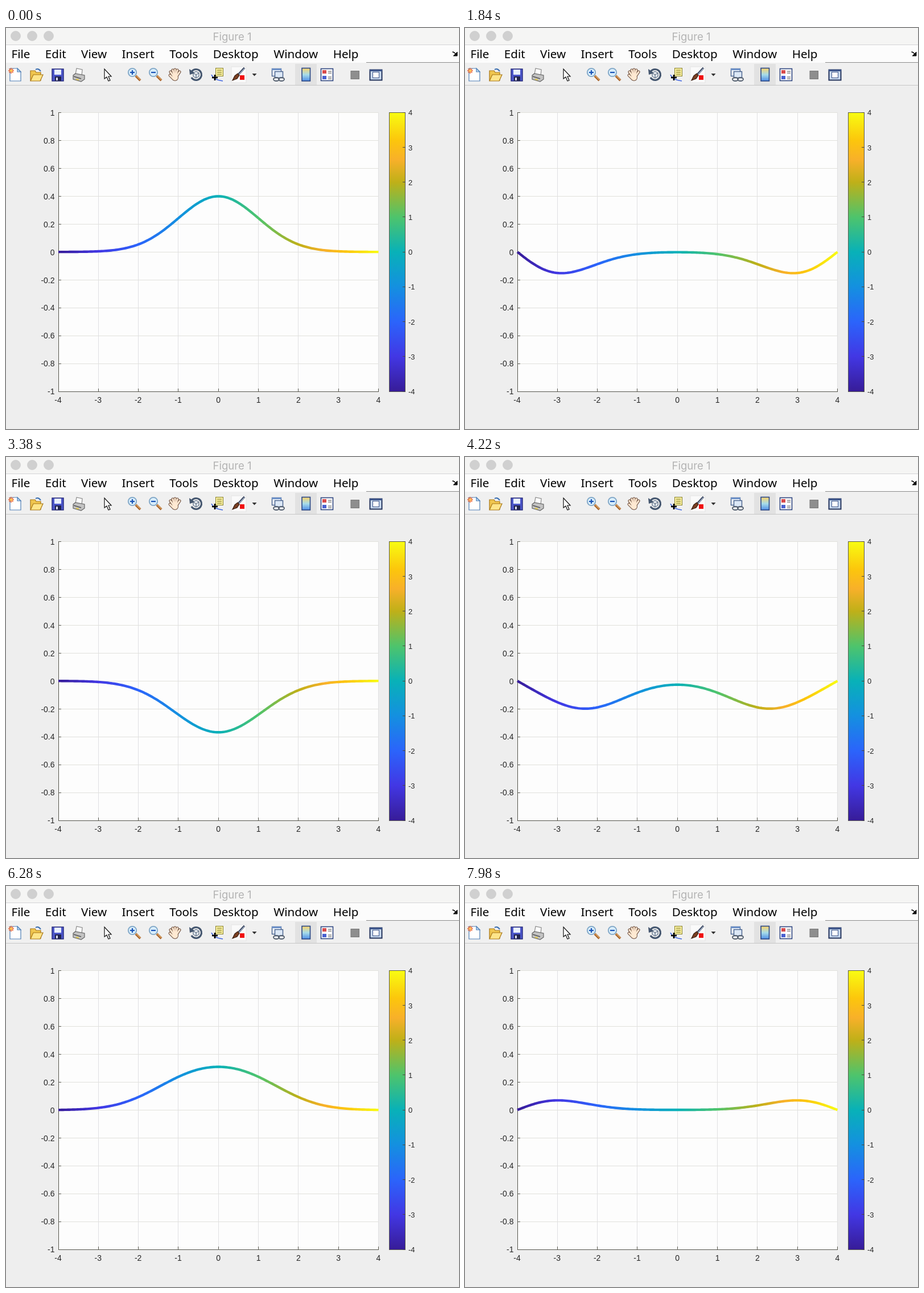
An HTML page with a canvas that plays this animation: 796x704 px, repeating every 8000 ms.

```html
<!DOCTYPE html>
<html lang="en">
<head>
<meta charset="utf-8">
<title>Figure 1</title>
<style>
html, body { margin: 0; width: 100%; height: 100%; overflow: hidden; background: #eee; }
canvas { display: block; }
</style>
</head>
<body>
<canvas id="stage" width="796" height="704"></canvas>
<script>
const stage = document.getElementById('stage');
const view = stage.getContext('2d');
const backdrop = document.createElement('canvas');
backdrop.width = stage.width;
backdrop.height = stage.height;
const c = backdrop.getContext('2d');

const LOOP = 8000;
const LEFT = 92, RIGHT = 654.5, TOP = 148.3, BOTTOM = 638;
const INK = '#262626', AXIS = '#55554c';
const px = x => LEFT + (x + 4) * (RIGHT - LEFT) / 8;
const py = y => BOTTOM - (y + 1) * (BOTTOM - TOP) / 2;
const snap = v => Math.floor(v) + .5;

// Colour map over 0..1
const MAP = {
  0: '#371c98', .125: '#4237e4', .25: '#2b64fb', .375: '#1490e0', .5: '#08b1b8',
  .625: '#4ec46c', .75: '#bfb018', .83: '#f8b02a', .9: '#fcc60c', 1: '#f8fc12'
};

function gradient(ctx, x0, y0, x1, y1, stops) {
  const g = ctx.createLinearGradient(x0, y0, x1, y1);
  for (const at in stops) g.addColorStop(+at, stops[at]);
  return g;
}

function rect(x, y, w, h, fill, stroke, width = 1) {
  if (fill) { c.fillStyle = fill; c.fillRect(x, y, w, h); }
  if (stroke) { c.strokeStyle = stroke; c.lineWidth = width; c.strokeRect(x, y, w, h); }
}

function line(colour, width, x0, y0, x1, y1) {
  c.beginPath();
  c.moveTo(x0, y0);
  c.lineTo(x1, y1);
  c.strokeStyle = colour;
  c.lineWidth = width;
  c.stroke();
}

function shape(path, fill, stroke, width = 1.2) {
  const p = new Path2D(path);
  if (fill) { c.fillStyle = fill; c.fill(p); }
  if (stroke) { c.strokeStyle = stroke; c.lineWidth = width; c.stroke(p); }
}

function disc(x, y, r, fill, stroke, width = 1) {
  c.beginPath();
  c.arc(x, y, r, 0, Math.PI * 2);
  if (fill) { c.fillStyle = fill; c.fill(); }
  if (stroke) { c.strokeStyle = stroke; c.lineWidth = width; c.stroke(); }
}

function text(str, x, y, font, colour, align = 'left') {
  c.font = font;
  c.fillStyle = colour;
  c.textAlign = align;
  c.fillText(str, x, y);
}

function stripes(colour, x, y, w, count, gap) {
  for (let i = 0; i < count; i++) rect(x, y + i * gap, w, 1.2, colour);
}

function drawBars() {
  rect(0, 0, 796, 704, '#eeeeee');
  rect(0, 0, 796, 29, '#f5f5f4');
  rect(0, 29, 796, 1, '#d3d3d6');
  rect(0, 30, 796, 31, '#fcfcfc');
  rect(0, 61, 796, 39, '#f0f0f0');
  rect(0, 100, 796, 1, '#c6c6c6');
  rect(633, 60, 163, 1, '#8c8c8c');
  for (let i = 0; i < 3; i++) disc(17 + 29 * i, 14, 8.5, '#d0d0d0', '#c8c8c8', .6);
  text('Figure 1', 397.5, 21.5, '18.5px Inter, Roboto, sans-serif', '#b3b3b3', 'center');
  drawMenu(9.5, 619.5);
  shape('M784 42h3l5 5M793 42v7h-7z', '#111', '#111', 1);
}

// Words spread over the given span with equal gaps
function drawMenu(from, to) {
  const words = 'File Edit View Insert Tools Desktop Window Help'.split(' ');
  const font = '500 20.6px "Noto Sans", "Open Sans", sans-serif';
  c.font = font;
  const widths = words.map(w => c.measureText(w).width);
  const gap = (to - from - widths.reduce((a, b) => a + b)) / (words.length - 1);
  let x = from;
  words.forEach((word, i) => {
    text(word, x, 53, font, '#000');
    x += widths[i] + gap;
  });
}

function magnifier(plus) {
  line('#a86228', 4, 6, 2, 14, 10);
  line('#e0a968', 1.4, 7, 2, 14, 9);
  disc(0, -4, 7.2, '#d8edfb', '#7fa6c6', 1.8);
  line('#1b55b8', 2.2, -4, -4, 4, -4);
  if (plus) line('#1b55b8', 2.2, 0, -8, 0, 0);
}

// Each icon is drawn around its own centre
const icons = {
  newPage() {
    shape('M-9-11H4l6 6V11H-9z', '#fff', '#4e7fb5');
    shape('M4-11l6 6H4z', '#bcd9f5', '#4e7fb5');
    for (let a = 0; a < Math.PI; a += Math.PI / 4) {
      const dx = 5 * Math.cos(a), dy = 5 * Math.sin(a);
      line('#ea5a24', 1.5, -7 - dx, -7 - dy, dx - 7, dy - 7);
    }
    disc(-7, -7, 2, '#ffd35a');
  },
  folder() {
    shape('M-10 10V-7h8l2 3h8V10z', '#f0c64f', '#a87616');
    shape('M-10 11l5-11H12L7 11z', '#ffe58a', '#a87616');
    shape('M-1-9q5-3 9 3', null, '#3c6fb0', 2);
  },
  disk() {
    rect(-10, -10, 20, 21, '#4b55c8', '#252a7c', 1.4);
    rect(-6, -9, 12, 9, '#e8f0ff');
    rect(-5, 3, 11, 8, '#20234e');
    rect(-3, 5, 3, 5, '#dde');
  },
  printer() {
    shape('M-6 0l2-11l10 2l-1 11z', '#fff', '#888');
    shape('M-10 1l4-3l16 3v7l-6 4l-14-4z', '#c3c3c3', '#666');
    line('#555', 1.5, -9, 3, 4, 7);
    line('#e2c848', 2, -5, 8, 0, 9);
  },
  pointer() {
    shape('M-5-10V7l4-3l3 7l3-1l-3-7h5z', '#fff', '#111');
  },
  zoomIn() { magnifier(true); },
  zoomOut() { magnifier(false); },
  hand() {
    c.lineCap = 'round';
    for (const [colour, extra] of [['#6f5140', 2], ['#ffe9d2', 0]]) {
      for (let i = -2; i <= 2; i++) line(colour, 3 + extra, i, 4, i * 4, i * i - 9);
      line(colour, 3 + extra, -3, 7, -9, 1);
      disc(0, 5, 5 + extra / 2, colour);
    }
  },
  rotate() {
    c.beginPath();
    c.arc(0, 0, 9.5, -2.6, 2.6);
    c.strokeStyle = '#44566f';
    c.lineWidth = 3;
    c.stroke();
    shape('M-12-10l1 10l9-3z', '#44566f');
    shape('M0-6l5 3v6l-5 3l-5-3v-6zM-5-3l5 3l5-3M0 0v6', '#dfe6ee', '#44566f', 1);
  },
  dataTip() {
    rect(-2.5, -11.5, 13, 14, '#f8efa0', '#8a8330');
    stripes('#8a8330', 0, -8.5, 8, 3, 3.5);
    shape('M-10 0q4 9 20 11', null, '#3b62e0', 1.6);
    line('#000', 2.6, -9, 5, 1, 5);
    line('#000', 2.6, -4, 0, -4, 10);
  },
  brush() {
    rect(-13, -14, 26, 28, '#fafafa', '#e3e3e3');
    line('#39455e', 3.4, 10, -12, -1, 0);
    line('#a9b7cc', 1.2, 10, -11, 0, 0);
    shape('M-2-2l3 3l-4 6l-8 3l4-8z', '#7b3f22', '#3c2115');
    rect(2, 1, 8, 8, '#f01010');
    shape('M23.5-2h8l-4 4.5z', '#333');
  },
  link() {
    rect(-10.5, -10.5, 16, 13, '#eaf1fa', '#47618c', 1.4);
    rect(-11, -11, 17, 3, '#6b8fc6');
    rect(-5.5, -5.5, 14, 11, '#dce8f6', '#47618c', 1.4);
    for (const x of [-3, 6]) {
      c.beginPath();
      c.ellipse(x, 8, 5, 3, 0, 0, Math.PI * 2);
      c.strokeStyle = '#4f5b6b';
      c.lineWidth = 1.8;
      c.stroke();
    }
  },
  colourBar() {
    rect(-19, -19, 38, 37, '#e2e2e2');
    const fill = gradient(c, 0, -11, 0, 11, { 0: '#f8d470', .5: '#a6dcea', 1: '#4f8ee6' });
    rect(-7, -11.5, 14.5, 22.5, fill, '#2a4684', 1.6);
  },
  legend() {
    rect(-10.5, -10.5, 21, 21, '#fff', '#2f4680', 1.6);
    rect(-8, -8, 7, 6, '#d94a4a');
    rect(-8, 2, 7, 6, '#4960d0');
    stripes('#666', 2, -6.5, 6, 2, 3);
    stripes('#666', 2, 3.5, 6, 2, 3);
  },
  block() {
    rect(-7, -6.5, 14.5, 14, '#8e8e8e', '#777');
  },
  panel() {
    rect(-10.5, -8.5, 21, 18, '#c8d9ee', '#25345c', 2);
    rect(-11, -9, 22, 3, '#3a5288');
    rect(-5.5, -4.5, 11, 10, '#fff', '#3a5288');
  }
};

// Icons sit one pitch apart; a wider gap opens each new group
function drawToolbar() {
  const groups = [
    [16, 'newPage folder disk printer'],
    [178, 'pointer'],
    [222, 'zoomIn zoomOut hand rotate dataTip brush'],
    [478, 'link'],
    [527, 'colourBar legend'],
    [613, 'block panel']
  ];
  for (const [start, names] of groups) {
    names.split(' ').forEach((name, i) => {
      c.save();
      c.translate(start + Math.round(37.3 * i), 82);
      icons[name]();
      c.restore();
    });
  }
}

function drawAxes() {
  const font = '14px "Liberation Sans", Arial, sans-serif';
  const small = '13px "Liberation Sans", Arial, sans-serif';
  rect(LEFT, TOP, RIGHT - LEFT, BOTTOM - TOP, '#fdfdfd');
  for (let v = -4; v <= 4; v++) {
    const x = snap(px(v));
    line('#e0e0e2', 1, x, TOP, x, BOTTOM);
    line(AXIS, 1, x, BOTTOM, x, BOTTOM - 5);
    text(v, px(v) - (v < 0 ? .5 : 0), 658, font, INK, 'center');
  }
  for (let i = -5; i <= 5; i++) {
    const y = snap(py(i / 5));
    line('#e1e1dc', 1, LEFT, y, RIGHT, y);
    line(AXIS, 1, LEFT, y, LEFT + 5, y);
    text(i / 5, 85.5, py(i / 5) + 5.4, font, INK, 'right');
  }
  line(AXIS, 1, snap(LEFT), TOP, snap(LEFT), BOTTOM + 1);
  line(AXIS, 1, LEFT, snap(BOTTOM), RIGHT + .5, snap(BOTTOM));

  rect(673.5, snap(TOP), 28, snap(BOTTOM) - snap(TOP), gradient(c, 0, BOTTOM, 0, TOP, MAP), '#5c5c50');
  for (let v = -4; v <= 4; v++) {
    const y = py(v / 4);
    line('#4a4a40', 1, 697, snap(y), 702, snap(y));
    text(v, 707, y + 5.1, small, INK);
  }
}

// Distance travelled by each half pulse: key points [step, distance]
const TRAVEL = [[0, 0], [16, 1.935], [40, 4.755], [73, 8.4], [111, 12.45], [134, 15.285], [171, 19.708]];

// Three steps every 140 ms, the middle one held longest
function stepAt(ms) {
  const r = ms % 140;
  return 3 * Math.floor(ms / 140) + (r >= 20) + (r >= 120);
}

function travelled(step) {
  const i = Math.max(1, TRAVEL.findIndex(([n]) => n >= step));
  const [n0, s0] = TRAVEL[i - 1], [n1, s1] = TRAVEL[i];
  return s0 + (s1 - s0) * (step - n0) / (n1 - n0);
}

// Normal density repeated with alternating sign, so both ends stay fixed
function pulse(x) {
  let sum = 0;
  for (let k = -5; k <= 5; k++) {
    const d = x - 8 * k;
    sum += (k % 2 ? -1 : 1) * Math.exp(-d * d / 2);
  }
  return sum / Math.sqrt(2 * Math.PI);
}

const curveInk = gradient(view, LEFT, 0, RIGHT, 0, MAP);

function draw() {
  const s = travelled(stepAt(performance.now() % LOOP));
  view.drawImage(backdrop, 0, 0);
  view.beginPath();
  for (let i = 0; i <= 200; i++) {
    const x = -4 + i / 25;
    view.lineTo(px(x), py((pulse(x - s) + pulse(x + s)) / 2));
  }
  view.strokeStyle = curveInk;
  view.lineWidth = 4.4;
  view.lineJoin = 'round';
  view.stroke();
  requestAnimationFrame(draw);
}

drawBars();
drawToolbar();
drawAxes();
draw();
</script>
</body>
</html>
```
